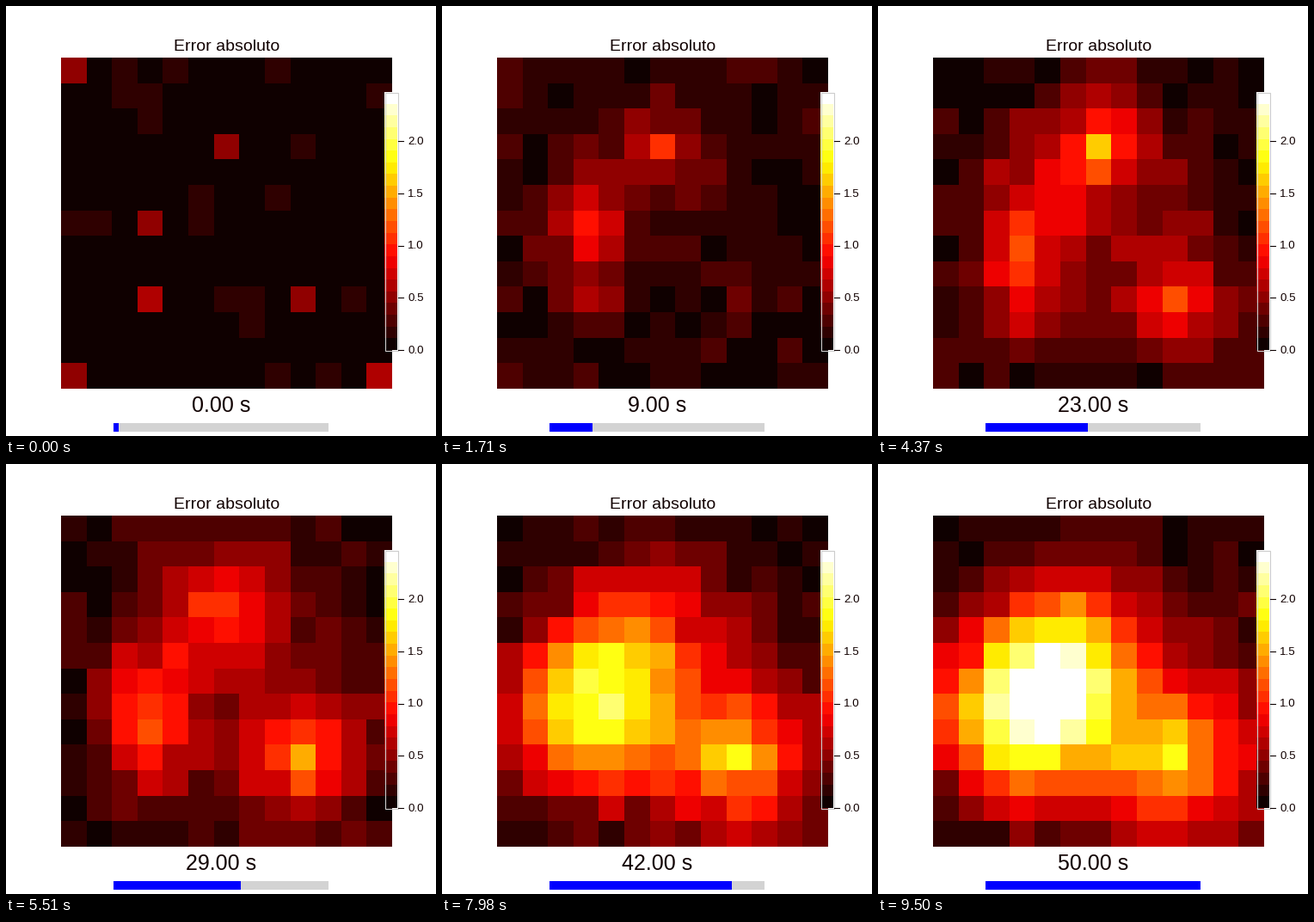
Recreate the animation shown at these times as a matplotlib script. Size 500 px wide and 500 px high, loop 9690 ms.

```python
import numpy as np
import matplotlib.pyplot as plt
from matplotlib.animation import FuncAnimation
from matplotlib.colors import ListedColormap
from matplotlib.patches import Rectangle

SIZE, N, LEVELS, FRAMES = 500, 13, 22, 51
LAST = FRAMES - 1
INK = "#100000"

plt.rcParams["font.family"] = "Liberation Sans"

# row, col, peak height, time of the peak, sharpness of the peak
SENSORS = [
    (3, 6, 13, 19, 2.5),
    (6, 3, 7, 13, 6),
    (9, 3, 5, 15, 6),
    (9, 9, 16, LAST, 2),
    (0, 0, 0, 1, 1),
    (12, 0, 0, 1, 1),
    (12, 12, 0, 1, 1),
]

rows, cols = np.mgrid[0:N, 0:N]
STEP = 3
knots = np.random.default_rng(4).normal(0, 0.7, (FRAMES // STEP + 2, N, N))


def smooth(t, a, b):
    x = np.clip((t - a) / (b - a), 0, 1)
    return x * x * (3 - 2 * x)


def surge(t, peak, n):
    """Rise to 1 at the peak time, then a slow decay."""
    x = t / peak
    return (x * np.exp(1 - x)) ** n


def bell(r, c, sr, sc):
    return np.exp(-((rows - r) / sr) ** 2 / 2 - ((cols - c) / sc) ** 2 / 2)


def noise(t):
    k, f = divmod(t, STEP)
    a = f / STEP * np.pi / 2
    return (0.45 + 0.55 * smooth(t, 0, 4)) * (
        knots[k] * np.cos(a) + knots[k + 1] * np.sin(a))


def field(t):
    """Error level of each cell at t seconds, as a colour index."""
    z = noise(t)
    # each sensor's error diffuses outwards
    reach = 0.4 * np.sqrt(t + 0.5)
    for r, c, top, peak, n in SENSORS:
        height = max(4 * np.exp(-t / 8), top * surge(t, peak, n))
        z += height * np.exp(-(np.hypot(rows - r, cols - c) / reach) ** 1.2)
    # early haze, the ridge on the left and the late bridge above it
    z += 1.8 * surge(t, 6, 3) * bell(4.5, 4.5, 3.5, 3.5)
    z += 18 * (t / LAST) ** 1.5 * bell(7.3, 3, 2.2, 1.25 + 1.15 * smooth(t, 25, 45))
    z += 9.5 * smooth(t, 30, 52) * bell(4.8, 4.7, 2.1, 2.1)
    return np.clip(np.rint(np.abs(z)), 0, LEVELS - 1)


fig = plt.figure(figsize=(SIZE / 100, SIZE / 100), dpi=100, facecolor="white")
ax = fig.add_axes([0, 0, 1, 1])
ax.axis("off")

cmap = ListedColormap(plt.get_cmap("hot")(np.linspace(0.011, 1, LEVELS)))
style = dict(cmap=cmap, vmin=-0.5, vmax=LEVELS - 0.5,
             interpolation="nearest", aspect="auto")


def label(x, y, text, pt, ha="center"):
    return ax.text(x, y, text, size=pt, ha=ha, va="baseline", color=INK)


def box(x, y, w, h, **kw):
    return ax.add_patch(Rectangle((x, y), w, h, **kw))


heat = ax.imshow(field(0), extent=(63.75, 448.75, 445, 60), zorder=1, **style)

ramp = np.arange(LEVELS)[::-1, None]
ax.imshow(ramp, extent=(440, 455, 400, 100), zorder=2, **style)
box(440.5, 100.5, 15, 300, fill=False, ec="#cccccc", lw=0.8, zorder=3)
for i in range(5):
    y = 400 - i * 60.75
    ax.plot([456, 462], [y, y], color=INK, lw=0.8, zorder=3)
    label(467, y + 4, f"{i / 2:.1f}", 9.6, ha="left")

label(256.25, 51.7, "Error absoluto", 14)
clock = label(250, 472, "", 18)
box(125, 485, 250, 10, fc="#d3d3d3", lw=0)
bar = box(125, 485, 6, 10, fc="blue", lw=0, zorder=4)

ax.set_xlim(0, SIZE)
ax.set_ylim(SIZE, 0)


def update(t):
    heat.set_data(field(t))
    clock.set_text(f"{t:.2f} s")
    bar.set_width(min(250, int(250 * (t + 1) / FRAMES + 1.5)))
    return heat, clock, bar


anim = FuncAnimation(fig, update, frames=FRAMES, interval=190,
                     repeat=True, repeat_delay=0)
plt.show()
```
